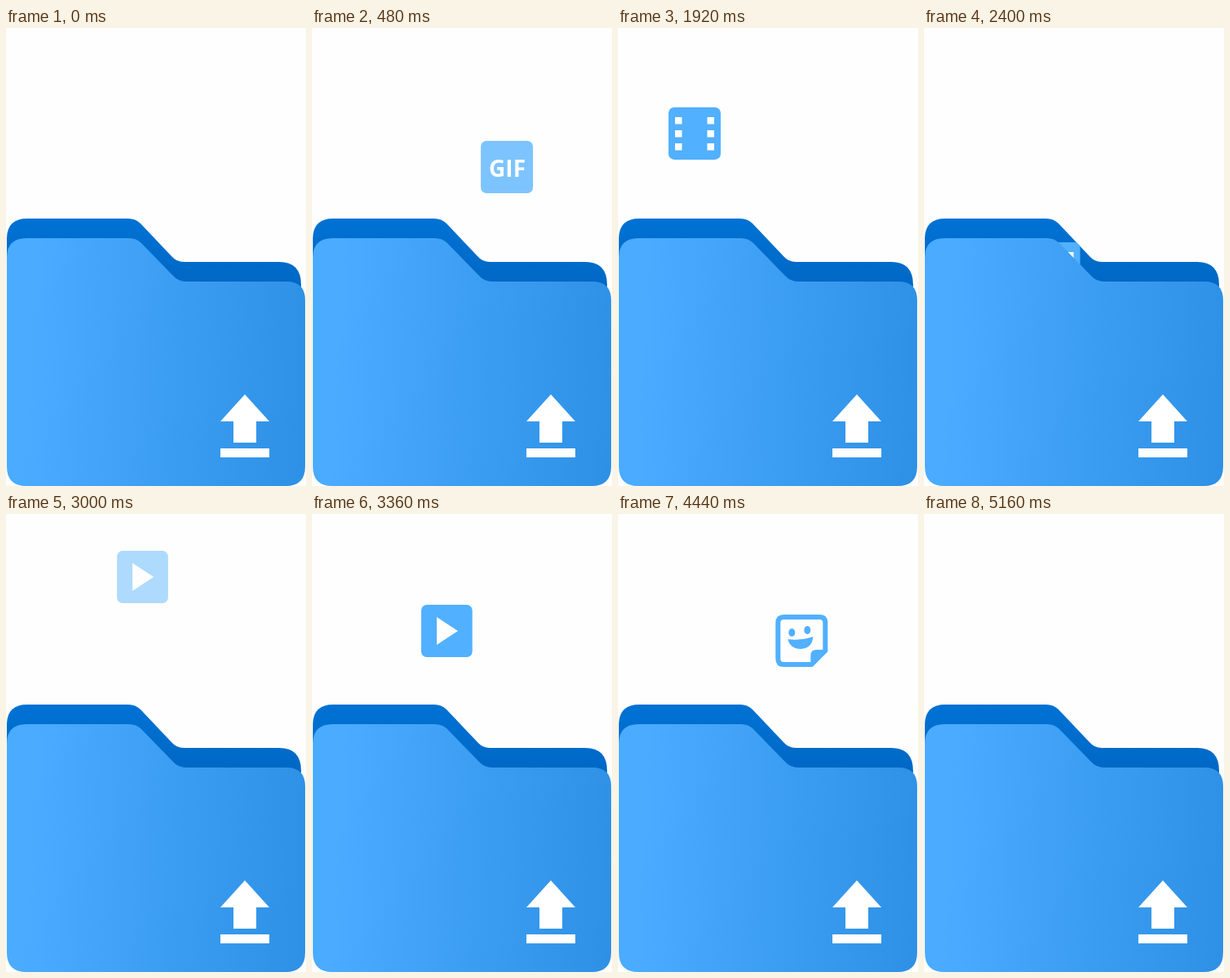
An HTML page for the animation above (5.28 s loop, 368x560 px).

```html
<!DOCTYPE html>
<html lang="en">
<head>
<meta charset="utf-8">
<title>Upload folder</title>
<style>
  html, body { margin: 0; width: 100%; height: 100%; overflow: hidden; background: #fefefe; }
  svg { display: block; width: 368px; height: 560px; }
  text { font: 700 28px "Open Sans", "Noto Sans", sans-serif; text-anchor: middle; }
</style>
</head>
<body>
<svg viewBox="0 0 368 560">
  <defs>
    <linearGradient id="front" gradientUnits="userSpaceOnUse" x1="0" y1="400" x2="368" y2="420">
      <stop offset=".08" stop-color="#4aabff"/>
      <stop offset="1" stop-color="#2e91e6"/>
    </linearGradient>
    <linearGradient id="back" gradientUnits="userSpaceOnUse" x1="0" y1="233" x2="0" y2="320">
      <stop offset="0" stop-color="#0072d4"/>
      <stop offset="1" stop-color="#0067c4"/>
    </linearGradient>
    <rect id="tile" width="64" height="64" rx="7" fill="#51b0ff"/>
  </defs>

  <path fill="url(#back)" d="M1 300V258Q1 233 26 233H150Q159 233 165 239L203 279Q209 286 218 286H335Q362 286 362 314V340H1Z"/>

  <g class="icon">
    <use href="#tile"/>
    <text x="32.5" y="44" fill="#fff">GIF</text>
  </g>
  <g class="icon">
    <use href="#tile"/>
    <path fill="#fff" d="M8 12h8.5v8.5H8zm0 16h8.5v8.5H8zm0 16h8.5v8.5H8zM47.5 12H56v8.5h-8.5zm0 16H56v8.5h-8.5zm0 16H56v8.5h-8.5z"/>
  </g>
  <g class="icon">
    <use href="#tile" transform="scale(.98 1)"/>
    <path fill="#fff" d="M19 15L45 32L19 49Z"/>
  </g>
  <g class="icon" fill="#51b0ff">
    <path fill="#fefefe" stroke="#51b0ff" stroke-width="6" stroke-linejoin="round" d="M10 3H54Q61 3 61 10V44L44 61H10Q3 61 3 54V10Q3 3 10 3Z"/>
    <path d="M43 62V50Q43 43 50 43H62Z"/>
    <ellipse cx="20" cy="22" rx="4" ry="5"/>
    <ellipse cx="39" cy="19" rx="4" ry="5"/>
    <path d="M15 30Q31 32 46 27Q45 41 31 42Q18 42 15 30Z"/>
  </g>

  <path fill="url(#front)" d="M1 281Q1 257 25 257H151Q160 257 166 263L204 302Q211 310 221 310H344Q367 310 367 333V536Q367 560 343 560H25Q1 560 1 536Z"/>
  <path fill="#fff" d="M293 448L323 481H307V507H279V481H263ZM263 514H323V525H263Z"/>
</svg>
<script>
  const LOOP = 5280, STEP = 120, FADE = 480, REST = 180;
  const moves = [
    { start: 62, fall: 740, fade: 565, from: [216, 80], to: [188, 262] },
    { start: 1382, fall: 1010, from: [36, 31.5], to: [127.5, 262] },
    { start: 2780, fall: 1000, from: [136.5, 34], to: [129, 263] },
    { start: 3765, fall: 1005, from: [219, 13], to: [162, 257] },
  ];
  const icons = document.querySelectorAll('.icon');

  function draw(now) {
    // The picture advances in even steps.
    const time = Math.floor((now % LOOP) / STEP) * STEP;
    moves.forEach(({ start, fall, fade = FADE, from, to }, i) => {
      const age = time - start;
      const visible = age > 0 && age < fall + REST;
      const p = Math.min(1, Math.max(0, age / fall)) ** 2;
      const [x, y] = from.map((a, k) => a + (to[k] - a) * p);
      icons[i].setAttribute('transform', `translate(${x} ${y})`);
      icons[i].setAttribute('opacity', visible ? Math.min(1, age / fade) : 0);
    });
  }

  const origin = performance.now();
  function tick() {
    draw(performance.now() - origin);
    requestAnimationFrame(tick);
  }
  tick();
</script>
</body>
</html>
```
